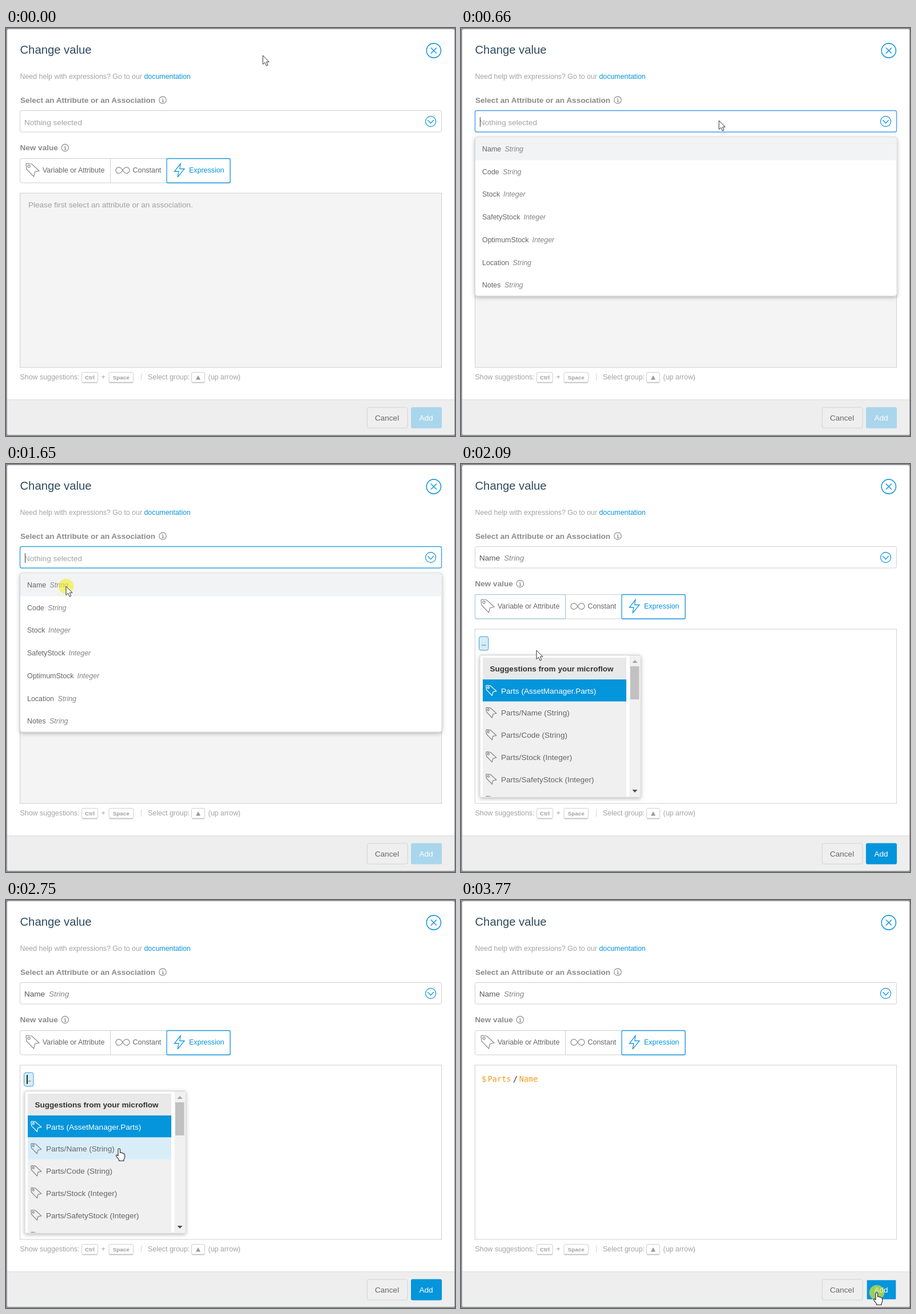
Animation of 785x714 px, one loop 3.87 s. Source, as an HTML page:

```html
<!DOCTYPE html>
<html lang="en">
<head>
<meta charset="utf-8">
<title>Change value</title>
<style>
  html, body { margin: 0; width: 100%; height: 100%; overflow: hidden; background: #8f9399; }
  svg { display: block; width: 785px; height: 714px; }
  text { font-family: "Liberation Sans", Arial, sans-serif; font-size: 13.55px; fill: #666; white-space: pre; }
  .small { font-size: 12.45px; }
  .hint { font-size: 12.4px; fill: #a3a3a3; }
  .label { font-weight: bold; fill: #8a8a8a; }
  .key { font-size: 9.8px; font-weight: bold; fill: #a0a0a0; }
  .type { font-style: italic; fill: #858585; }
  .code { font-family: "DejaVu Sans Mono", monospace; fill: #f79a1c; }
  .blue { fill: #0595db; }
  .line { fill: none; stroke: #8a8a8a; stroke-width: 1.2; }
  .blueLine { fill: none; stroke: #1b9ade; stroke-width: 1.3; }
  .box { fill: #fff; stroke: #cfcfcf; }
</style>
</head>
<body>
<svg viewBox="0 0 785 714">
  <defs>
    <filter id="shadow" x="-10%" y="-10%" width="120%" height="125%">
      <feDropShadow dx="0" dy="2" stdDeviation="3.5" flood-opacity=".28"/>
    </filter>
    <g id="info">
      <circle r="6.2" class="line"/>
      <path d="M-1.3 -1H.3V3.2M-1.5 3.2H2M0 -3.6V-2.3" class="line"/>
    </g>
    <g id="tag">
      <path d="M1 3Q1 1 3 1L11 2L24 14L16.5 16L14.5 24L2 11Z"/>
      <circle cx="6" cy="6" r="2.1"/>
    </g>
    <clipPath id="listClip"><path d="M34 335H313V582H34Z"/></clipPath>
  </defs>

  <rect width="785" height="714" fill="#8f9399"/>
  <rect x="2" y="2" width="782" height="710" rx="3" fill="#fff"/>
  <path d="M2 651H784V709Q784 712 781 712H5Q2 712 2 709Z" fill="#eee"/>
  <path d="M2 650.5H784" stroke="#dcdcdc"/>

  <text x="24.5" y="45" style="font-size:20.25px;fill:#2f4a5e">Change value</text>
  <g class="blueLine" style="stroke-width:1.6">
    <circle cx="747.8" cy="39.5" r="12.6"/>
    <path d="M742.8 34.5L752.8 44.5M752.8 34.5L742.8 44.5"/>
  </g>
  <text x="24.5" y="89" class="hint">Need help with expressions? Go to our <tspan class="blue">documentation</tspan></text>

  <text x="25" y="131" class="label">Select an Attribute or an Association</text>
  <use href="#info" x="274" y="126"/>
  <rect id="field" x="24.5" y="144.5" width="737" height="37.5" rx="3" class="box"/>
  <text id="empty" x="32" y="170" fill="#a3a3a3" style="fill:#a3a3a3">Nothing selected</text>
  <text id="chosen" x="32" y="169" style="fill:#555">Name<tspan class="type" x="75">String</tspan></text>
  <path id="fieldCaret" d="M33.5 156V173" stroke="#444"/>
  <g class="blueLine">
    <circle cx="742.5" cy="163.5" r="9"/>
    <path d="M737.3 161L742.5 166.8L747.7 161"/>
  </g>

  <text x="24.5" y="214" class="label">New value</text>
  <use href="#info" x="103.3" y="209.5"/>
  <rect x="24.5" y="228.5" width="367" height="42.5" rx="3" class="box"/>
  <path d="M182.5 228.5V271" stroke="#cfcfcf"/>
  <rect id="tagHover" x="24.5" y="228.5" width="158" height="42.5" rx="2" fill="none"/>
  <rect x="281" y="228.5" width="111" height="42.5" rx="2" class="blueLine"/>
  <use href="#tag" x="34" y="236" class="line"/>
  <path class="line" d="M204 249C201.5 245 199.5 243.7 197.3 243.7a5.3 5.3 0 0 0 0 10.6C200 254.3 201.8 252.5 204 249C206.2 245.5 208 243.7 210.7 243.7a5.3 5.3 0 0 1 0 10.6C208.5 254.3 206.5 253 204 249Z"/>
  <path class="blueLine" d="M305 237.5L294.5 251H302L300 261L312 246.5H303.7Z"/>
  <text x="64" y="253" class="small">Variable or Attribute</text>
  <text x="221.5" y="253" class="small">Constant</text>
  <text x="320" y="253" class="small blue">Expression</text>

  <rect id="editor" x="24.5" y="289" width="737" height="305" class="box"/>
  <text id="prompt" x="39" y="314" style="fill:#a0a0a0">Please first select an attribute or an association.</text>

  <g id="hints">
    <text x="24.5" y="615" class="hint">Show suggestions:</text>
    <text x="166.5" y="615" class="hint">+</text>
    <path d="M236.5 605V617" stroke="#d4d4d4"/>
    <text x="248" y="615" class="hint">Select group:</text>
    <text x="353.5" y="615" class="hint">(up arrow)</text>
  </g>

  <rect x="631.5" y="664" width="70.5" height="36" rx="3" fill="#efefef" stroke="#d3d3d3"/>
  <text x="645" y="687">Cancel</text>
  <rect id="add" x="708" y="663.5" width="54" height="37" rx="3"/>
  <text x="722.5" y="687" style="fill:#fff">Add</text>

  <g id="menu">
    <rect x="24.5" y="191" width="737.5" height="278" rx="4" fill="#fff" stroke="#d2d5d7" filter="url(#shadow)"/>
    <path d="M25 231.5V195Q25 191.5 28.5 191.5H758Q761.5 191.5 761.5 195V231.5Z" fill="#f1f3f4"/>
  </g>

  <g id="popup">
    <rect x="33" y="334.5" width="281" height="248.5" rx="2" fill="#fff" stroke="#d0d0d0" filter="url(#shadow)"/>
    <path d="M38 377H289V582.5H38Z" fill="#f0f0f0"/>
    <path d="M38 339H289V377H38Z" fill="#e9e9e9"/>
    <path d="M38 377H289V415.5H38Z" fill="#0595db"/>
    <path id="rowHover" d="M38 415.5H289V454H38Z" fill="#d9edf8"/>
    <path d="M294.5 335H313.5V582.5H294.5Z" fill="#f1f1f1"/>
    <path d="M296 354H311.5V412H296Z" fill="#c1c1c1"/>
    <path d="M299.5 348H308.5L304 343Z" fill="#a3a3a3"/>
    <path d="M299.5 570H308.5L304 575Z" fill="#505050"/>
    <text x="50.5" y="363" style="font-weight:bold;fill:#333">Suggestions from your microflow</text>
    <g id="list" clip-path="url(#listClip)"></g>
  </g>
  <g id="token">
    <rect x="31.5" y="302" width="16.5" height="24" rx="3.5" fill="#d6ecf9" stroke="#3f9bd8"/>
    <path d="M36.5 317H38M39 317H40.5M41.7 317H43.2" stroke="#456f8c" stroke-width="1.5"/>
  </g>
  <g id="expression">
    <text x="36" y="318" class="code">$</text>
    <text x="46.7" y="318" class="code">Parts</text>
    <text x="91" y="318" class="code" style="fill:#333">/</text>
    <text x="101.7" y="318" class="code">Name</text>
  </g>
  <path id="editCaret" d="M0 306V322" stroke="#111" stroke-width="1.8"/>

  <g id="pointer">
    <circle id="press" r="13.2" fill="#f3ee2c" opacity=".62"/>
    <path id="arrow" d="M0 0V15.5L3.6 12.2L6.2 18L8.8 16.8L6.3 11.2H11Z" fill="#fff" stroke="#333" stroke-linejoin="round"/>
    <path id="hand" d="M-2 1.7Q-2 0 -.2 0Q1.5 0 1.5 1.7V7.5Q3 5.8 4.6 8Q6.2 6.8 7.3 9Q9.6 8.3 9.6 11V15Q9.6 17.5 8 19V21.5H-.5V19.5L-5 13.7Q-6 11.8 -4.8 11Q-3.6 10.6 -2 12.8Z" fill="#fff" stroke="#222" stroke-width="1.1" stroke-linejoin="round"/>
  </g>
</svg>
<script>
const LOOP = 3870;
const NS = "http://www.w3.org/2000/svg";
const $ = id => document.getElementById(id);

function make(parent, name, attrs, text = "") {
  const el = document.createElementNS(NS, name);
  for (const key in attrs) el.setAttribute(key, attrs[key]);
  el.textContent = text;
  return parent.appendChild(el);
}

// Attribute rows: name, type, x of the type
[["Name", "String", 76.5], ["Code", "String", 73], ["Stock", "Integer", 74],
 ["SafetyStock", "Integer", 109.5], ["OptimumStock", "Integer", 124.5],
 ["Location", "String", 90.5], ["Notes", "String", 76]
].forEach(([name, type, x], i) => {
  const y = 216 + i * 39.7;
  make($("menu"), "text", { x: 37, y, class: "small" }, name);
  make($("menu"), "text", { x, y, class: "small type" }, type);
});

["Parts (AssetManager.Parts)", "Parts/Name (String)", "Parts/Code (String)",
 "Parts/Stock (Integer)", "Parts/SafetyStock (Integer)", ""
].forEach((label, i) => {
  const y = 401.5 + i * 38.8;
  const ink = i ? "#666" : "#fff";
  make($("list"), "use", {
    href: "#tag", class: "line", style: `stroke:${i ? "#808080" : "#fff"};stroke-width:1.5`,
    transform: `translate(43 ${y - 15}) scale(.78)`
  });
  make($("list"), "text", { x: 70, y, style: `fill:${ink}` }, label);
});

function keycap(x, width, label) {
  make($("hints"), "rect", { x, y: 602.5, width, height: 18, rx: 2.5, fill: "#fff", stroke: "#cfcfcf" });
  make($("hints"), "path", { d: `M${x + 1} 620.5h${width - 2}`, stroke: "#c4c4c4", "stroke-width": 1.8 });
  if (label) make($("hints"), "text", { x: x + width / 2, y: 615, class: "key", "text-anchor": "middle" }, label);
}
keycap(132.5, 28, "Ctrl");
keycap(180, 42.5, "Space");
keycap(324.5, 23, "");
make($("hints"), "path", { d: "M332 615.5H340L336 608Z", fill: "#9a9a9a" });

// Pointer stops: time, x, y, flags (h = hand, p = pressed)
const stops = [
  [0, 449, 48], [100, 449, 57], [220, 450, 86], [320, 450, 121], [440, 451, 150],
  [560, 451, 162, "p"], [660, 451, 162], [870, 428, 168], [980, 368, 183],
  [1090, 300, 196], [1210, 215, 207], [1310, 150, 212], [1430, 115, 213],
  [1540, 105, 214], [1650, 105, 214, "p"], [1870, 106, 220], [1980, 120, 262],
  [2090, 132, 326], [2210, 150, 372, "h"], [2310, 178, 416, "h"],
  [2430, 195, 432, "h"], [2530, 198, 435, "h"], [2870, 198, 435, "hp"],
  [2970, 198, 435], [3210, 265, 468], [3310, 440, 550], [3430, 610, 635],
  [3530, 700, 680], [3650, 727, 687, "h"], [3770, 727, 687, "hp"]
];

const show = (id, on) => { $(id).style.display = on ? "" : "none"; };

function draw(t) {
  const within = (from, to = LOOP) => t >= from && t < to;
  const picked = within(1870);
  const pressed = within(3770);

  const [, x, y, flags = ""] = stops.filter(s => s[0] <= t).pop();
  $("pointer").setAttribute("transform", `translate(${x} ${y})`);
  show("hand", flags.includes("h"));
  show("arrow", !flags.includes("h"));
  show("press", flags.includes("p"));

  const focused = within(560, 1870);
  $("field").style.stroke = focused ? (t < 870 ? "#4a9cf0" : "#35a3de") : "#cfcfcf";
  $("field").style.strokeWidth = focused ? 1.4 : 1;
  show("fieldCaret", within(560, 980) || within(1540, 1870));
  show("empty", !picked);
  show("chosen", picked);
  show("menu", within(660, 1870));

  $("tagHover").style.stroke = within(1980, 2090) ? "#1b9ade" : within(2090, 2210) ? "#8fc3de" : "none";
  $("editor").style.fill = picked ? "#fff" : "#f4f4f4";
  show("prompt", !picked);
  show("token", within(1980, 2970));
  show("popup", within(1980, 2970));
  show("rowHover", within(2310, 2970));
  show("expression", within(2970));
  show("editCaret", within(2530, 3430));
  $("editCaret").setAttribute("transform", `translate(${t < 2970 ? 37 : 136.5} 0)`);

  const inset = pressed ? 1.7 : 0;
  $("add").style.fill = picked ? "#0595db" : "#a9d6ec";
  $("add").setAttribute("x", 708 + inset);
  $("add").setAttribute("y", 663.5 + inset);
  $("add").setAttribute("width", 54 - 2 * inset);
  $("add").setAttribute("height", 37 - 2 * inset);
  $("add").setAttribute("rx", pressed ? 1 : 3);
}

const start = performance.now();
function tick() {
  draw((performance.now() - start) % LOOP);
  requestAnimationFrame(tick);
}
tick();
</script>
</body>
</html>
```
